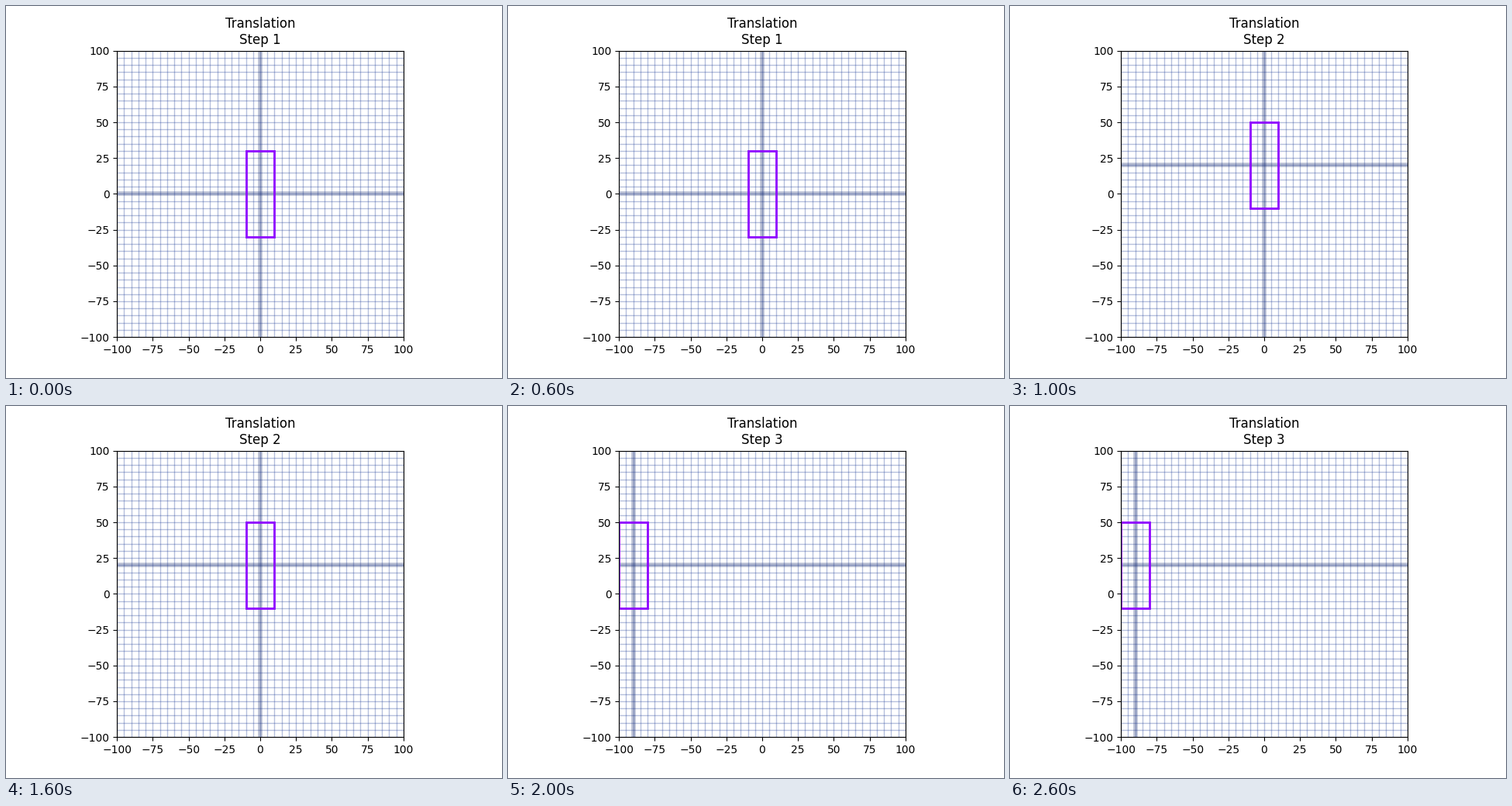
These frames come from a looping animation (640x480 px, 3000 ms). A matplotlib script:

```python
import numpy as np
import matplotlib.pyplot as plt
from matplotlib.animation import FuncAnimation
from matplotlib.patches import Rectangle

LIMIT = 100
GRID = "#0F3091"
AXIS = "#14286E"
VIOLET = "#8F00FF"
WIDTH, HEIGHT = 20, 60
CENTERS = [(0, 0), (0, 20), (-90, 20)]

fig, ax = plt.subplots(figsize=(6.4, 4.8), dpi=100)
ax.set_aspect("equal")
ax.set_xlim(-LIMIT, LIMIT)
ax.set_ylim(-LIMIT, LIMIT)
ticks = np.arange(-LIMIT, LIMIT + 1, 25)
ax.set_xticks(ticks)
ax.set_yticks(ticks)

for pos in range(-LIMIT, LIMIT + 1, 5):
    ax.axvline(pos, color=GRID, lw=1, alpha=0.3)
    ax.axhline(pos, color=GRID, lw=1, alpha=0.3)

x_axis = ax.axhline(0, color=AXIS, lw=4, alpha=0.3)
y_axis = ax.axvline(0, color=AXIS, lw=4, alpha=0.3)
box = Rectangle((0, 0), WIDTH, HEIGHT, fill=False, ec=VIOLET, lw=2, zorder=2.2)
ax.add_patch(box)
title = ax.set_title("")


def update(step):
    x, y = CENTERS[step]
    x_axis.set_ydata([y, y])
    y_axis.set_xdata([x, x])
    box.set_xy((x - WIDTH / 2, y - HEIGHT / 2))
    title.set_text(f"Translation\nStep {step + 1}")
    return x_axis, y_axis, box, title


anim = FuncAnimation(fig, update, frames=len(CENTERS), interval=1000,
                     repeat=True, repeat_delay=0, blit=False)
plt.show()
```
